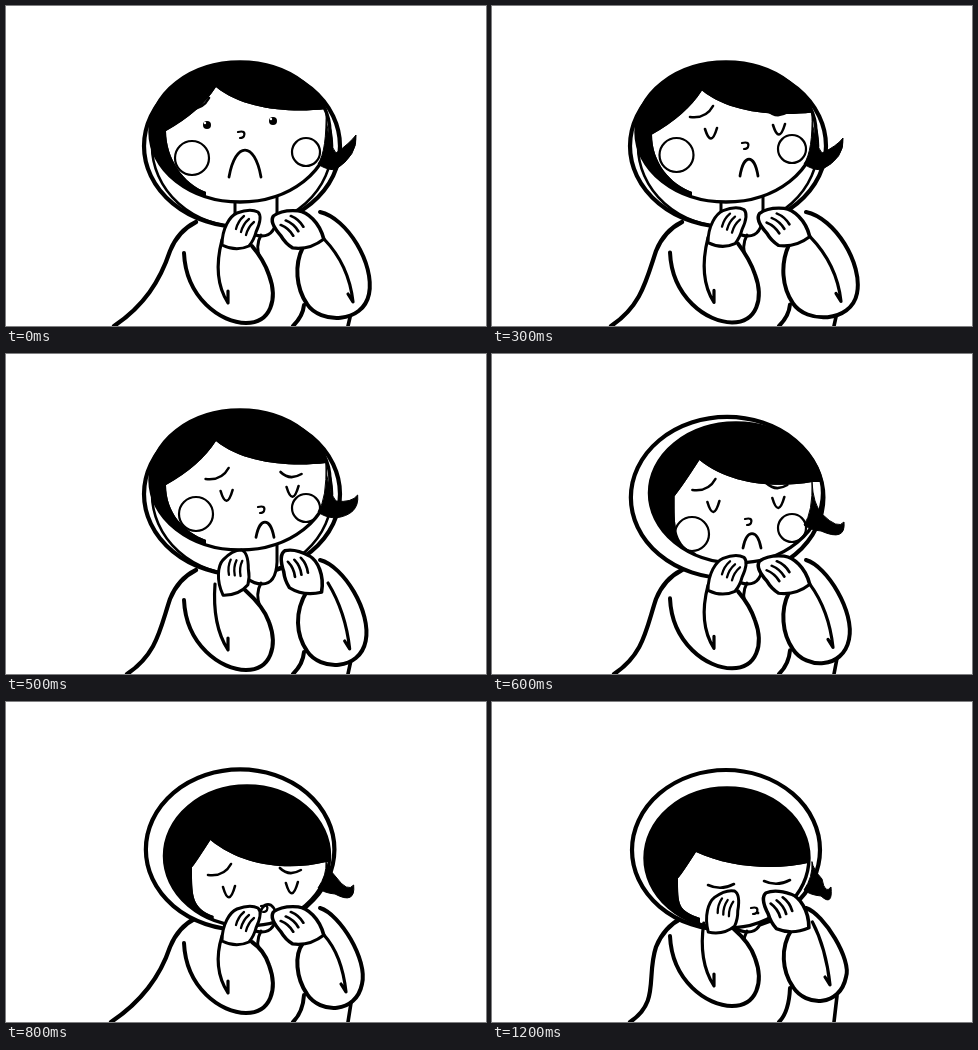
Animation of 480x320 px, one loop 1.3 s. Source, as an HTML page:

```html
<!DOCTYPE html>
<html lang="en">
<head>
<meta charset="utf-8">
<title>Crying girl</title>
<style>
html, body { margin: 0; width: 100%; height: 100%; overflow: hidden; background: #fff; }
svg { display: block; width: 100%; height: 100%; stroke-linecap: round; stroke-linejoin: round; }
</style>
</head>
<body>
<svg id="stage" viewBox="0 0 480 320"></svg>
<script>
const STEP = 100, STEPS = 13;
const INK = '#000', PAPER = '#fff';

// Linear value between [step, value] pairs, held at both ends.
function track(step, ...keys) {
  const next = keys.findIndex(([at]) => at > step);
  if (next === 0) return keys[0][1];
  if (next < 0) return keys[keys.length - 1][1];
  const [[s0, v0], [s1, v1]] = [keys[next - 1], keys[next]];
  return v0 + (v1 - v0) * (step - s0) / (s1 - s0);
}

const path = (d, width, fill = 'none') =>
  `<path d="${d}" fill="${fill}" stroke="${width ? INK : 'none'}" stroke-width="${width}"/>`;
const ellipse = ({ x, y, rx, ry }, width = 0, fill = 'none') =>
  `<ellipse cx="${x}" cy="${y}" rx="${rx}" ry="${ry}" fill="${fill}" stroke="${INK}" stroke-width="${width}"/>`;
const circle = (x, y, r, width, fill) => ellipse({ x, y, rx: r, ry: r }, width, fill);

// The head sinks into the hood while the hands come up to the eyes.
function poseAt(step) {
  const at = (...keys) => track(step, ...keys);
  const headY = at([5, 126], [6, 139], [8, 154], [10, 156]);
  const sink = (headY - 126) / 30;
  const tilt = at([3, 0], [5, 1], [6, 0], [8, 0], [10, .6]);
  const handY = at([0, 224], [5, 220], [8, 224], [10, 209], [12, 211]);
  const eyeY = at([0, 119], [3, 127], [5, 141], [6, 152], [8, 189], [12, 187]);
  return {
    step, sink,
    head: { x: at([5, 234], [6, 244], [8, 241], [10, 235]), y: headY, rx: 90 - 8 * sink, ry: 70 },
    hood: { x: 236 - 2 * sink, y: 140 + 8 * sink, rx: 98 - 4 * sink, ry: 81 - sink },
    part: { x: 210 - 6 * sink, y: at([0, 81], [5, 87], [6, 106], [8, 138], [10, 150]) },
    flick: { x: at([0, 36], [6, 38], [12, 25]), y: at([0, -30], [3, -27], [5, -18], [6, -4]) },
    eyeL: { x: at([0, 201], [3, 219], [8, 223], [12, 229]), y: eyeY },
    eyeR: { x: at([0, 267], [3, 287], [12, 285]), y: eyeY - 4 },
    lid: { half: at([8, 6], [12, 13]), depth: at([3, 13], [8, 14], [12, 4]) },
    nose: { x: at([0, 236], [3, 254], [12, 263]), y: eyeY + 8 + step },
    mouth: {
      half: at([0, 16], [3, 9], [10, 9], [12, 0]),
      height: at([0, 27], [3, 17], [10, 11], [12, 0]),
      below: at([0, 44], [3, 32], [6, 28], [8, 10], [10, 15], [12, 4])
    },
    cheekY: at([0, 152], [3, 149], [5, 160], [6, 180], [8, 222]),
    handL: { x: 234 - 7 * tilt, y: handY, turn: -25 * tilt },
    handR: { x: 293 + 4 * tilt, y: handY - 1, turn: -14 + 24 * tilt },
    elbow: at([0, 317], [5, 316], [8, 311], [12, 304]),
    reach: at([0, 363], [3, 365], [6, 357], [12, 354]),
    foot: at([0, 108], [3, 119], [6, 122], [8, 105], [10, 133], [12, 138])
  };
}

function drawBody({ hood, foot, elbow, step }) {
  const lining = step < 6 ? ellipse({ ...hood, rx: hood.rx - 8 }, 2.6) : '';
  return path(`M${foot} 320C${foot + 30} 300 154 275 164 245Q172 225 190 216`, 4.2)
    + path(`M287 320Q297 310 298 ${elbow - 18}`, 4)
    + path(`M342 320L345 ${elbow - 10}`, 3.6)
    + ellipse(hood, 4.2, PAPER) + lining
    + path('M229 190V208Q240 230 256 230Q270 230 271 208V190', 3, PAPER)
    + path('M255 229Q249 240 254 253', 3);
}

function drawFeatures({ step, eyeL, eyeR, lid, nose, mouth, cheekY }) {
  let out = '';
  if (step < 8) {
    out += circle(185 + (cheekY - 150) * .5, cheekY, 17, 2.2, PAPER)
      + circle(300, cheekY - 6, 14, 2.2, PAPER);
  }
  if (step < 11) {
    out += path(`M${eyeL.x - 21} ${eyeL.y - 16}q16 2 23 -11`, 2.6)
      + path(`M${eyeR.x - 12} ${eyeR.y - 19}q9 9 21 2`, 2.6);
  }
  for (const { x, y } of [eyeL, eyeR]) {
    out += step < 2
      ? circle(x, y, 4, 0, INK) + circle(x - 2, y - 2, 1.2, 0, PAPER)
      : path(`M${x - lid.half} ${y - 4}q${lid.half} ${lid.depth * 1.5} ${lid.half * 2} -1`, 2.6);
  }
  const { half, height, below } = mouth;
  const open = step > 8 && step < 12;
  return out + path(`M${nose.x - 4} ${nose.y - 1}q8 -2 6 4q-1 2 -4 2`, 2.2)
    + path(`M${nose.x + 3 - half} ${nose.y + below}c${half * .4} ${-height * 1.33} ${half * 1.6} ${-height * 1.33} ${half * 2} 0`,
      2.8, open ? INK : 'none');
}

function drawHead(pose) {
  const { head, part, flick, sink } = pose;
  const temple = { x: 160 + 26 * Math.min(1, sink * 2), y: part.y + 44 - 18 * sink };
  const lock = { x: 200 + 8 * sink, y: head.y + 60 };
  const fringeY = Math.min(part.y + 22, 160);
  const dip = fringeY + 4 + 5 * sink;
  const floor = head.y + 90;
  const face = `M${part.x} ${part.y}Q${part.x - 16} ${part.y + 25} ${temple.x} ${temple.y}`
    + `C${temple.x} ${temple.y + 28} ${lock.x - 22} ${lock.y - 8} ${lock.x} ${lock.y}`
    + `V${floor}H345V${fringeY}H320C285 ${dip} 238 ${dip - 3} ${part.x} ${part.y}Z`;

  const x = 314, y = head.y + 33;
  const tip = { x: x + flick.x, y: y + flick.y };
  const curl = `M${x + 6} ${fringeY}Q${x + 7} ${y - 22} ${x + 16} ${y - 12}Q${tip.x - 6} ${tip.y + 8} ${tip.x} ${tip.y}`
    + `Q${tip.x + 2} ${tip.y + 20} ${x + 15} ${y + 5}Q${x + 4} ${y + 4} ${x - 2} ${y - 1}Q${x + 7} ${y - 14} ${x + 6} ${fringeY}Z`;

  return `<clipPath id="skull">${ellipse(head)}</clipPath>`
    + `<clipPath id="face" clip-path="url(#skull)">${path(face, 0)}</clipPath>`
    + ellipse(head, 0, INK)
    + `<g clip-path="url(#face)">${path(face, 0, PAPER)}${drawFeatures(pose)}</g>`
    + ellipse(head, 3.4) + path(curl, 1, INK);
}

function drawHand({ x, y, turn }, scale) {
  let out = path('M-18 15C-18 -2 -10 -14 -3 -17Q10 -22 18 -18Q23 -13 16 2Q14 10 9 16Q-4 22 -18 15Z', 3, PAPER);
  for (let i = 0; i < 3; i++) out += path(`M${4 + 5 * i} ${3 * i - 14}q-6 5 -8 13`, 2.3);
  return `<g transform="translate(${x} ${y}) rotate(${turn}) scale(${scale})">${out}</g>`;
}

function drawArms({ handL, handR, elbow: y, reach }) {
  const low = y - 3;
  return path(`M178 ${y - 70}C180 ${y - 25} 215 ${y} 240 ${y}C265 ${y} 272 ${y - 24} 263 ${y - 48}`
      + `Q258 ${y - 63} ${handL.x + 12} ${handL.y + 16}`, 4, PAPER)
    + path(`M314 206C${reach - 22} 212 ${reach + 6} 258 ${reach} ${low - 26}`
      + `C${reach - 6} ${low + 4} 314 ${low + 4} 301 ${low - 16}C290 ${low - 32} 288 ${low - 55} ${handR.x + 4} ${handR.y + 18}`, 4, PAPER)
    + path(`M${handL.x - 18} ${handL.y + 10}Q206 ${y - 45} 222 ${y - 20}v-12`, 3.2)
    + path(`M${handR.x + 25} ${handR.y + 10}Q${reach - 20} ${low - 55} ${reach - 16} ${low - 18}l-5 -8`, 3.2)
    + drawHand(handL, '1 1') + drawHand(handR, '-1.2 1.05');
}

const stage = document.getElementById('stage');
const start = performance.now();
let shown = -1;

function tick() {
  const step = Math.floor((performance.now() - start) / STEP) % STEPS;
  if (step !== shown) {
    shown = step;
    const pose = poseAt(step);
    stage.innerHTML = drawBody(pose) + drawHead(pose) + drawArms(pose);
  }
  requestAnimationFrame(tick);
}
tick();
</script>
</body>
</html>
```
